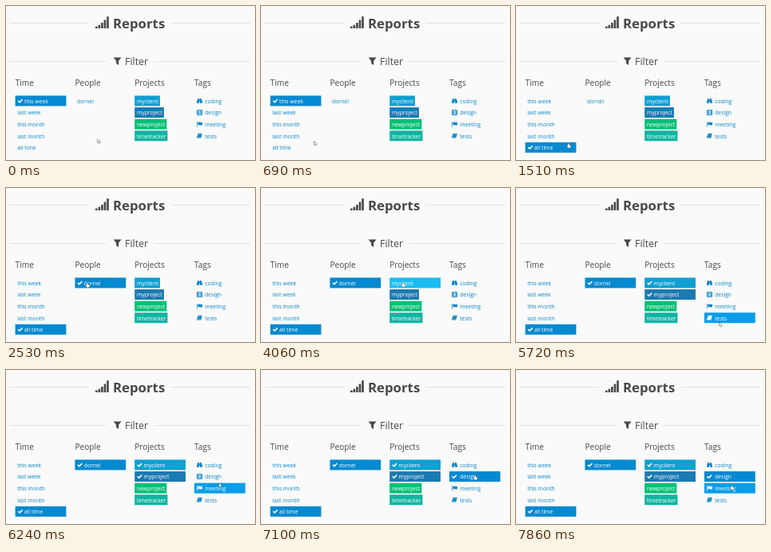
An HTML page with a canvas for the animation above (8000 ms loop, 312 px wide and 193 px high).

```html
<!DOCTYPE html>
<html lang="en">
<head>
<meta charset="utf-8">
<title>Reports</title>
<style>
html, body { margin: 0; width: 100%; height: 100%; overflow: hidden; background: #fafafa; }
canvas { display: block; width: 312px; height: 193px; }
</style>
</head>
<body>
<canvas id="stage"></canvas>
<script>
const W = 312, H = 193, LOOP = 8000;
const FONT = '"Open Sans", "Noto Sans", sans-serif';
const BG = '#fafafa', INK = '#484848', RULE = '#e2e2e2';
const LINK = '#0a86c9', ACTIVE = '#0589d0', HOVER = '#079de9';
const LEFT = 11.6, COL_PITCH = 74.8, COL_W = 63.8;
const TOP = 112.4, ROW_PITCH = 14.6, ROW_H = 13, LABEL = 6.8;

const canvas = document.getElementById('stage');
const ctx = canvas.getContext('2d');
const dpr = window.devicePixelRatio || 1;
canvas.width = W * dpr;
canvas.height = H * dpr;

// "on" and "off" are the times at which an item is selected and deselected.
const columns = [
  { title: 'Time', items: [
    { label: 'this week', on: 0, off: 1090 },
    { label: 'last week' },
    { label: 'this month' },
    { label: 'last month' },
    { label: 'all time', on: 1090 }] },
  { title: 'People', items: [{ label: 'dornel', on: 2520 }] },
  { title: 'Projects', items: [
    { label: 'myclient', on: 4200, fill: '#0f9fd3', hover: '#18bdf2' },
    { label: 'myproject', on: 4920, fill: '#1c7ab2', hover: '#2593d4' },
    { label: 'newproject', fill: '#06c076', hover: '#0bdc8a' },
    { label: 'timetracker', fill: '#10b5a1', hover: '#18d2bb' }] },
  { title: 'Tags', items: [
    { label: 'coding', icon: binoculars },
    { label: 'design', icon: film, on: 7090 },
    { label: 'meeting', icon: flag },
    { label: 'tests', icon: book }] }
];

// The pointer jumps to each place in a few steps; power > 1 lingers first.
const home = { x: 115, y: 167 };
const move = (from, to, steps, x, y, power = 1) => ({ from, to, steps, x, y, power });
const moves = [
  move(120, 534, 4, 69, 166),
  move(672, 810, 2, 64.5, 173.5),
  move(1090, 2020, 8, 94, 127, 5),
  move(2140, 2530, 4, 101.5, 119),
  move(2830, 3220, 4, 154.5, 118.5),
  move(3500, 3650, 2, 177.5, 118),
  move(4060, 4930, 7, 180, 131, 3),
  move(5300, 5702, 4, 255, 168.7, 0.3),
  move(5836, 6240, 4, 267, 141.9),
  move(6390, 6640, 2, 268, 132),
  move(7470, 7860, 4, 270, 144.5)
];

function pointerAt(t) {
  let { x, y } = home;
  for (const m of moves) {
    if (t < m.from) break;
    const gap = (m.to - m.from) / (m.steps - 1);
    const step = Math.min(m.steps, Math.floor((t - m.from) / gap + 1e-6) + 1);
    const k = (step / m.steps) ** m.power;
    x += (m.x - x) * k;
    y += (m.y - y) * k;
  }
  return [x, y];
}

function text(str, x, y, size, color, weight = 400) {
  ctx.font = `${weight} ${size}px ${FONT}`;
  ctx.fillStyle = color;
  ctx.fillText(str, x, y);
}

function rect(x, y, w, h, color) {
  ctx.fillStyle = color;
  ctx.fillRect(x, y, w, h);
}

function trace(...points) {
  ctx.beginPath();
  for (let i = 0; i < points.length; i += 2) ctx.lineTo(points[i], points[i + 1]);
}

function poly(color, ...points) {
  trace(...points);
  ctx.closePath();
  ctx.fillStyle = color;
  ctx.fill();
}

function at(x, y, paint, arg) {
  ctx.save();
  ctx.translate(x, y);
  paint(arg);
  ctx.restore();
}

function check(color) {
  trace(0.6, 3, 2.5, 4.8, 6, 1.2);
  ctx.strokeStyle = color;
  ctx.lineWidth = 1.6;
  ctx.stroke();
}

function binoculars(color) {
  poly(color, 1.3, 0.3, 3, 0.3, 3, 6, 0, 6, 0, 4);
  poly(color, 5.7, 0.3, 4, 0.3, 4, 6, 7, 6, 7, 4);
  rect(3, 1.5, 1, 2.3, color);
}

function film(color) {
  ctx.strokeStyle = color;
  ctx.lineWidth = 0.8;
  ctx.strokeRect(0.4, 0.4, 6.4, 5.4);
  ctx.strokeRect(1.8, 0.4, 3.6, 5.4);
  for (const y of [1.8, 2.9, 4]) rect(0.4, y, 6.4, 0.4, color);
}

function flag(color) {
  rect(0.3, 0, 0.8, 6.6, color);
  ctx.beginPath();
  ctx.moveTo(1.5, 0.9);
  ctx.bezierCurveTo(3.5, -0.6, 4.6, 1.8, 7, 0.5);
  ctx.lineTo(7, 4.2);
  ctx.bezierCurveTo(4.6, 5.5, 3.5, 3.1, 1.5, 4.5);
  ctx.fillStyle = color;
  ctx.fill();
}

function book(color) {
  poly(color, 1.8, 0.2, 6.8, 0.2, 5.4, 5.9, 0.3, 5.9, 0.2, 4.6);
  ctx.globalAlpha = 0.6;
  rect(2.6, 1.6, 2.6, 0.5, BG);
  rect(1.1, 4.6, 3.8, 0.5, BG);
}

function pointer(hand) {
  if (hand) {
    ctx.beginPath();
    ctx.roundRect(-0.3, 0, 1.2, 4, 0.6);
    ctx.roundRect(-1, 2.2, 4, 3.4, 1);
  } else {
    trace(0, 0, 0, 4.4, 1, 3.6, 1.7, 5.2, 2.4, 4.8, 1.8, 3.3, 3.1, 3.2);
    ctx.closePath();
  }
  ctx.strokeStyle = '#444';
  ctx.lineWidth = 1;
  ctx.stroke();
  ctx.fillStyle = '#fff';
  ctx.fill();
}

function rule(y, gapStart, gapEnd) {
  rect(5, y, gapStart - 5, 1, RULE);
  rect(gapEnd, y, 306 - gapEnd, 1, RULE);
}

function header() {
  rule(21, 104, 207);
  for (let i = 0; i < 5; i++) {
    const h = 2.4 + 1.5 * i + 0.4 * i * i;
    rect(112 + i * 3.55, 28 - h, 2.6, h, INK);
  }
  text('Reports', 134, 27.8, 16.8, INK, 700);

  rule(69, 126, 186);
  poly(INK, 134.6, 64.4, 144.6, 64.4, 141.1, 68.8, 141.1, 74, 138.1, 72, 138.1, 68.8);
  text('Filter', 149, 73.8, 12.4, INK);
}

function drawItem(item, x, y, hovered, t) {
  const { label, icon, fill, on = Infinity, off = Infinity } = item;
  const selected = t >= on && t < off;
  const wide = selected || hovered;
  if (wide || fill) {
    ctx.font = `400 ${LABEL}px ${FONT}`;
    const width = wide ? COL_W : ctx.measureText(label).width + 4.9;
    const color = hovered && !selected ? item.hover || HOVER : fill || ACTIVE;
    rect(x, y, width, ROW_H, color);
  }
  const ink = wide || fill ? '#fff' : LINK;
  const mark = selected ? check : icon;
  if (mark) at(x + 3, y + 3.4, mark, ink);
  text(label, x + (icon ? 13.2 : selected ? 11.4 : 2.7), y + 9.3, LABEL, ink);
}

function draw(t) {
  const [px, py] = pointerAt(t);
  ctx.setTransform(dpr, 0, 0, dpr, 0, 0);
  rect(0, 0, W, H, BG);
  header();
  let hand = false;
  columns.forEach(({ title, items }, c) => {
    const x = LEFT + c * COL_PITCH;
    text(title, x, 99.9, 10.1, INK);
    items.forEach((item, r) => {
      const y = TOP + r * ROW_PITCH;
      const inside = py - y;
      const hovered = px >= x && px < x + COL_W && inside >= 0 && inside < ROW_H;
      hand = hand || hovered && inside > 0.8 && inside < ROW_H - 0.8;
      drawItem(item, x, y, hovered, t);
    });
  });
  at(px, py, pointer, hand);
}

const start = performance.now();
function tick() {
  draw((performance.now() - start) % LOOP);
  requestAnimationFrame(tick);
}
tick();
</script>
</body>
</html>
```
